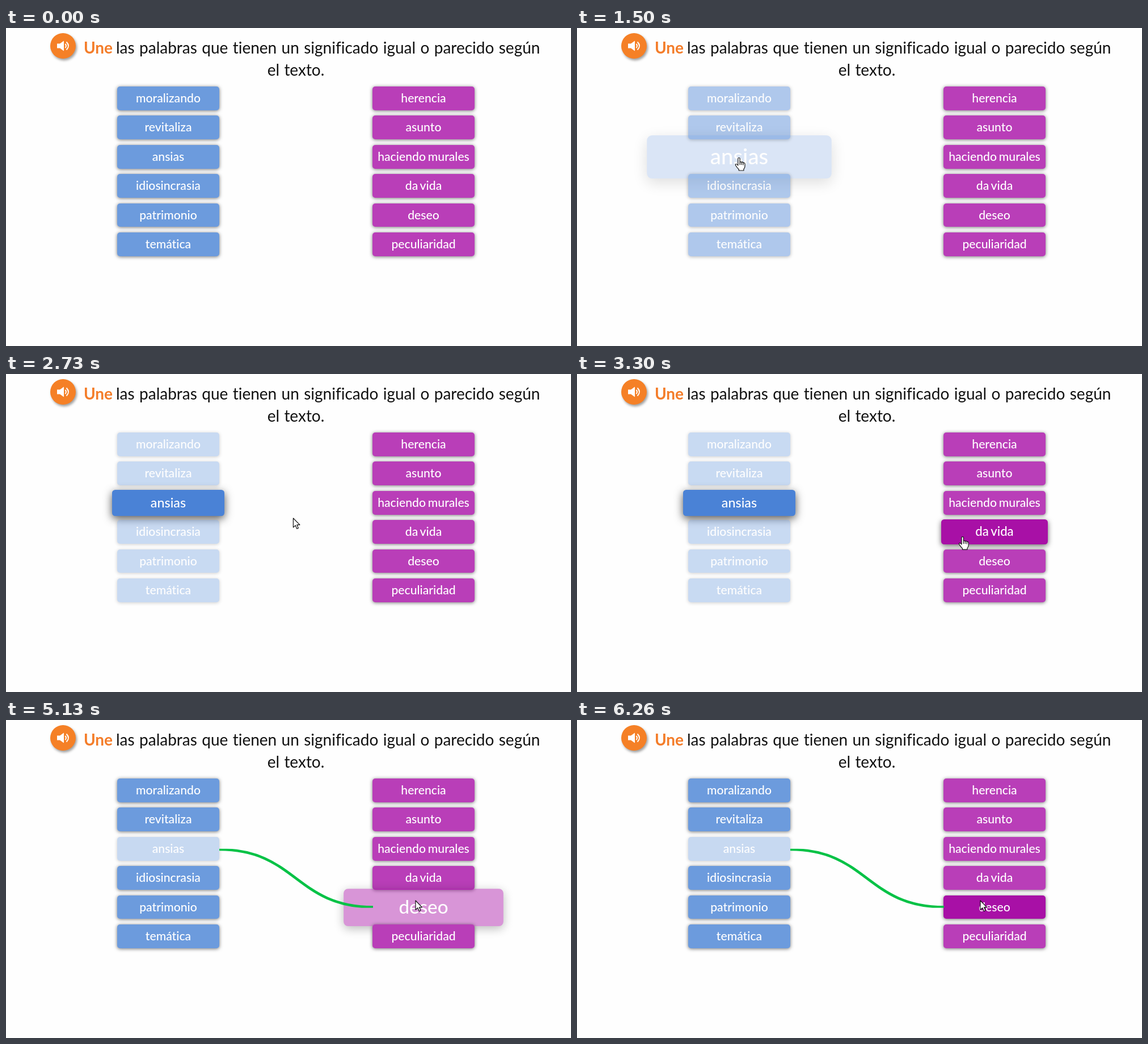
An HTML page for the animation above (6300 ms loop, 996 by 560 pixels).

```html
<!DOCTYPE html>
<html lang="es">
<head>
<meta charset="utf-8">
<title>Une las palabras</title>
<style>
html, body { margin: 0; width: 100%; height: 100%; overflow: hidden; background: #fefefe; }
#stage { position: absolute; left: 0; top: 0; width: 996px; height: 560px; overflow: hidden;
  background: #fefefe; font-family: Lato, "Open Sans", sans-serif; font-variant-ligatures: none; }
svg { position: absolute; left: 0; top: 0; }
text { font-size: 28px; word-spacing: 1.2px; fill: #111; }
.word { position: absolute; width: 180px; height: 41.8px; line-height: 41px; border-radius: 5px;
  color: #fff; font-size: 21.2px; font-weight: 500; word-spacing: -1.5px; text-align: center;
  white-space: nowrap; }
.speaker { filter: drop-shadow(2px 3px 2px rgba(0, 0, 0, .38)); }
</style>
</head>
<body>
<div id="stage">
  <svg width="996" height="100">
    <circle class="speaker" cx="100.5" cy="31.5" r="22.5" fill="#f58026"/>
    <path d="M90 27.5h5l7-5v18l-7-5h-5z" fill="#fff"/>
    <path d="M104.5 28q3 3.500 0 7M106.500 24.500q7 7 0 14" fill="none" stroke="#fff" stroke-width="2"/>
    <text x="137" y="45" style="fill:#f47d2a;font-weight:700">Une</text>
    <text x="194" y="45">las palabras que tienen un significado igual o parecido según</text>
    <text x="511" y="84" text-anchor="middle">el texto.</text>
  </svg>
  <div id="words"></div>
  <svg width="996" height="560">
    <clipPath id="band"><rect x="376" y="226.800" width="271" height="104"/></clipPath>
    <path id="link" d="M376 228C511 228 511 329.500 647 329.500" clip-path="url(#band)"
      fill="none" stroke="#06c246" stroke-width="4.6"/>
    <g stroke="#111" stroke-width="1.2" stroke-linejoin="round" fill="#fff">
      <path id="arrow" d="M0 0V16.200L3.800 12.800L6.400 18.700L9 17.500L6.500 11.800H11.500Z"/>
      <path id="hand" d="M-1.700 14V2Q-1.700 .5 0 .5T1.700 2V8.200Q2.500 7 4.600 8.400Q6 7.300 7.500 9.200
        Q9.200 8.500 10.500 10.800V15.500Q10.500 18.500 8.400 20.500V23H-.2V21Q-3 18.500 -5.800 14
        Q-6.800 12 -5 11.500Q-3.500 11.400 -1.700 14ZM1.700 8.200V13M4.600 9V13M7.500 9.800V13.500"/>
    </g>
  </svg>
</div>
<script>
const LOOP = 6300;
const LEFT = ['moralizando', 'revitaliza', 'ansias', 'idiosincrasia', 'patrimonio', 'temática'];
const RIGHT = ['herencia', 'asunto', 'haciendo murales', 'da vida', 'deseo', 'peculiaridad'];
const BLUE = { base: [108, 155, 221], dark: [74, 130, 214] };
const PURPLE = { base: [185, 62, 184], dark: [168, 16, 166] };
const HOVER = 1.044, DIM = .36;

// Cursor stops: time, x, y
const PATH = [[40, -14, 365], [250, 95, 312], [450, 215, 247], [660, 268, 228], [700, 268, 228],
  [760, 285.5, 228], [1690, 285.5, 228], [2300, 358, 231], [2360, 358, 231], [2960, 598, 268],
  [3000, 602, 270], [3080, 655, 284], [3300, 679.5, 286], [3480, 706, 300], [3630, 738, 330],
  [4720, 738, 330], [5130, 722, 318], [5400, 722, 318], [5960, 711, 318]];

const $ = id => document.getElementById(id);
const mix = (a, b, k) => a + (b - a) * k;
const ramp = (t, from, to) => Math.max(0, Math.min(1, (t - from) / (to - from)));
const ease = (t, from, to) => { const k = ramp(t, from, to); return k * k * (3 - 2 * k); };
const show = (el, on) => { el.style.visibility = on ? 'visible' : 'hidden'; };

function along(points, t) {
  let i = 1;
  while (i < points.length - 1 && t > points[i][0]) i++;
  const [a, b] = [points[i - 1], points[i]];
  const k = ramp(t, a[0], b[0]);
  return [mix(a[1], b[1], k), mix(a[2], b[2], k)];
}

function column(names, x) {
  return names.map((name, i) => {
    const el = document.createElement('div');
    el.className = 'word';
    el.textContent = name;
    el.style.left = x + 'px';
    el.style.top = 103 + 51.4 * i + 'px';
    $('words').append(el);
    return el;
  });
}

function paint(el, color, { scale = 1, alpha = 1, dark = 0, lift = 0 }) {
  const rgb = color.base.map((c, i) => Math.round(mix(c, color.dark[i], dark)));
  const s = el.style;
  s.background = `rgb(${rgb})`;
  s.transform = scale === 1 ? 'none' : `scale(${scale})`;
  s.opacity = alpha;
  s.boxShadow = `0 ${1 + 3 * lift}px ${6 + 8 * lift}px rgba(0,0,0,${.54 + .14 * lift})`;
}

const hovered = k => ({ scale: mix(1, HOVER, k), dark: k, lift: .45 * k });

// Big and clear, shrinking to normal size while becoming solid
function zoomIn(t, start) {
  const k = ramp(t, start, start + 862);
  return { scale: 2 - k, alpha: k, dark: 1, lift: 1 };
}

function pressed(t, start) {
  const state = hovered(1);
  state.scale -= .015 * ease(t, start, start + 100);
  return state;
}

function chosen(t) {
  if (t < 1060) return hovered(ease(t, 400, 640));
  if (t < 1336) return pressed(t, 1060);
  if (t < 2200) {
    const state = zoomIn(t, 1336);
    state.alpha = Math.min(state.alpha, .7);
    return state;
  }
  const grow = ease(t, 2200, 2480), leave = ease(t, 4720, 5060);
  return {
    scale: mix(1 + .1 * grow, 1, leave),
    alpha: mix(mix(.7, 1, ease(t, 2300, 2560)), .37, leave),
    dark: 1 - leave,
    lift: 1 - leave
  };
}

function match(t) {
  if (t < 4460) return hovered(ease(t, 3560, 3900));
  if (t < 4756) return pressed(t, 4460);
  const state = zoomIn(t, 4756);
  state.lift = mix(.6, .1, ease(t, 5360, 6200));
  return state;
}

const left = column(LEFT, 196), right = column(RIGHT, 646);

function draw(t) {
  const alpha = mix(mix(1, DIM, ramp(t, 1240, 1600)), 1, ease(t, 4720, 5060));
  left.forEach((el, i) => paint(el, BLUE, i === 2 ? chosen(t) : { alpha }));
  right.forEach((el, i) => {
    const state = i === 4 ? match(t)
      : i === 3 ? hovered(ease(t, 3050, 3290) * (1 - ease(t, 3470, 3760))) : {};
    paint(el, PURPLE, state);
  });
  show($('link'), t >= 4740);

  const [x, y] = along(PATH, t);
  const pointing = t > 420 && t < 1700 || t > 3060 && t < 4740;
  show($('hand'), pointing);
  show($('arrow'), !pointing && t >= 60);
  for (const id of ['hand', 'arrow']) $(id).setAttribute('transform', `translate(${x} ${y})`);
}

const start = performance.now();
function tick() {
  draw((performance.now() - start) % LOOP);
  requestAnimationFrame(tick);
}
tick();
</script>
</body>
</html>
```
